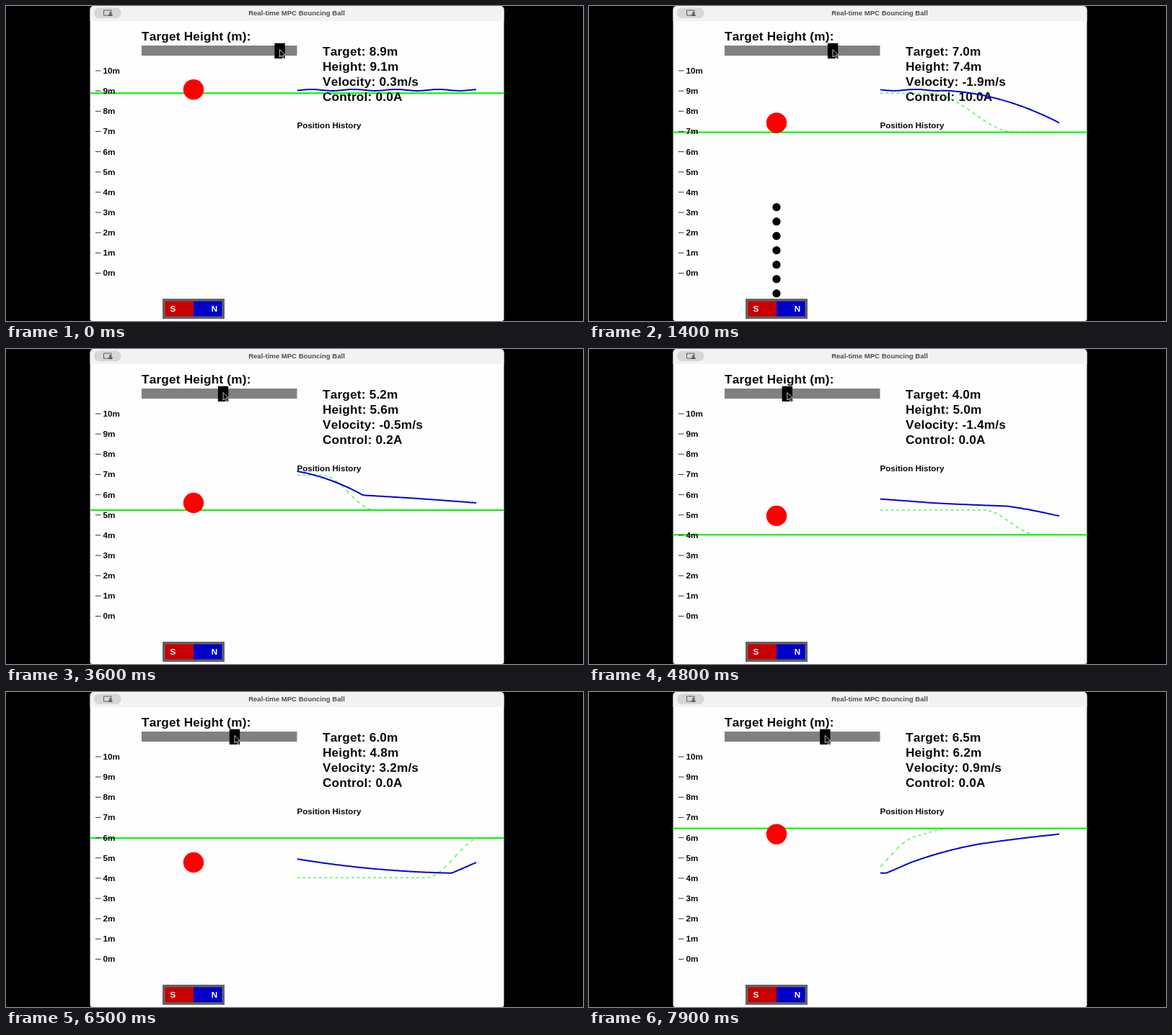
An HTML page with a canvas for the animation above (8000 ms loop, 800 px wide and 438 px high).

```html
<!DOCTYPE html>
<html lang="en">
<head>
<meta charset="utf-8">
<title>Real-time MPC Bouncing Ball</title>
<style>
html, body { margin: 0; width: 100%; height: 100%; overflow: hidden; background: #000; }
canvas { display: block; width: 800px; height: 438px; }
</style>
</head>
<body>
<canvas id="stage" width="800" height="438"></canvas>
<script>
const ctx = document.getElementById('stage').getContext('2d');
const LOOP = 8000, STEP = 100;
const SANS = '"Liberation Sans", Arial, sans-serif';
const INK = '#0a0a0a';
const ZERO = 371.5, METRE = 28.15;
const WIN = { x: 116.6, w: 573.8 };
const GRAPH = { x: 403.7, w: 248.3, span: 1690, n: 100 };
const BALL_X = 260;
const SPEED_SCALE = 1620 / METRE; // px per ms to shown m/s

// Slider drags: start, end (ms), change (m)
const drags = [
  [190, 980, -1.93], [2150, 2640, -1.72], [4090, 4590, -1.22],
  [6030, 6560, 2.03], [6480, 6860, 0.41]
];

// Arcs of the ball: start (ms), height there (px), bend
const arcs = [
  [300, 117.5, -39], [1400, 162.5, 0], [1900, 169.8, -18], [2532, 203.3, -2],
  [3600, 214, 1], [4310, 218.5, -3], [4760, 231, 16.5], [6269, 251.8, 0],
  [6500, 237, -8.5], [7140, 211.5, -2.4], [7900, 197.6, 0]
];

function ease(x) {
  x = Math.min(1, Math.max(0, x));
  return x * x * (3 - 2 * x);
}

const target = t =>
  drags.reduce((h, [a, b, change]) => h + change * ease((t - a) / (b - a)), 8.89);

function ballY(t) {
  if (t < arcs[0][0]) return 116.9 - Math.cos((t - 45) * Math.PI / 200);
  let i = 0;
  while (i < arcs.length - 2 && t >= arcs[i + 1][0]) i++;
  const [t0, y0, bend] = arcs[i], [t1, y1] = arcs[i + 1];
  const f = (t - t0) / (t1 - t0);
  return y0 + (y1 - y0) * f + bend * f * (1 - f);
}

// Mean upward speed between two times
const speed = (a, b) => (ballY(a) - ballY(b)) / (b - a) * SPEED_SCALE;

// The coil is on where the ball gains upward speed
function coil(t) {
  const gain = speed(t + 69, t + 71) - speed(t - 31, t - 29);
  return gain > 0 ? Math.min(10, 3 * gain * gain) : 0;
}

const toY = h => ZERO - h * METRE;

function rect(x, y, w, h, color) {
  ctx.fillStyle = color;
  ctx.fillRect(x, y, w, h);
}

function roundRect(x, y, w, h, radii, color) {
  ctx.fillStyle = color;
  ctx.beginPath();
  ctx.roundRect(x, y, w, h, radii);
  ctx.fill();
}

function disc(x, y, r, color) {
  ctx.fillStyle = color;
  ctx.beginPath();
  ctx.arc(x, y, r, 0, 2 * Math.PI);
  ctx.fill();
}

function text(s, x, y, size, color = INK, align = 'left', gap = 0) {
  ctx.font = `bold ${size}px ${SANS}`;
  ctx.fontKerning = 'none';
  ctx.letterSpacing = gap + 'px';
  ctx.textAlign = align;
  ctx.fillStyle = color;
  ctx.fillText(s, x, y);
}

const big = (s, x, y) => text(s, x, y, 17.2, INK, 'left', 0.2);

function drawWindow() {
  rect(0, 0, 800, 438, '#000');
  roundRect(WIN.x, 0, WIN.w, 438, [5, 5, 3, 3], '#fefefe');
  roundRect(WIN.x, 0, WIN.w, 21, [5, 5, 0, 0], '#f4f1f2');
  roundRect(122, 2.5, 37.5, 14.5, 7.25, '#d9d6d7');
  ctx.strokeStyle = '#5c5a5b';
  ctx.lineWidth = 1;
  ctx.strokeRect(135.5, 6, 10.5, 7);
  disc(144.5, 9.8, 1.5, '#5c5a5b');
  rect(142, 11.5, 5.5, 2.5, '#5c5a5b');
  text('Real-time MPC Bouncing Ball', 403, 13.2, 9.55, '#4f4d4e', 'center');
}

function drawScale() {
  for (let m = 0; m <= 10; m++) {
    const y = toY(m);
    rect(124, y - 0.5, 7.5, 1, '#333');
    text(m + 'm', 134.5, y + 3.9, 11.7);
  }
}

function drawMagnet(amps) {
  rect(217, 407, 86, 28, '#646464');
  rect(220.5, 410.5, 39.5, 21, '#c80000');
  rect(260, 410.5, 39.5, 21, '#0000c8');
  text('S', 231.3, 424.5, 11.7, '#fff', 'center');
  text('N', 289, 424.5, 11.7, '#fff', 'center');
  if (amps > 5) for (let i = 0; i < 7; i++) disc(BALL_X, 399.7 - 20 * i, 5.6, '#000');
}

function drawSlider(knob) {
  big('Target Height (m):', 188, 48.3);
  rect(188, 55, 215.5, 14, '#808080');
  rect(knob - 7.2, 51.7, 14.4, 21.3, '#000');
}

function drawReadout(t, amps) {
  const lines = [
    `Target: ${target(t).toFixed(1)}m`,
    `Height: ${((ZERO - ballY(t)) / METRE).toFixed(1)}m`,
    `Velocity: ${speed(t - 30, t + 70).toFixed(1)}m/s`,
    `Control: ${amps.toFixed(1)}A`
  ];
  lines.forEach((s, i) => big(s, 439, 69.2 + 21 * i));
}

function drawHistory(now) {
  const { x, w, span, n } = GRAPH;
  const px = i => x + w * i / (n - 1);
  const time = i => now - span * (1 - i / (n - 1));
  const goal = i => toY(target(time(i)));
  text('Position History', 403.5, 170, 11.6);
  ctx.lineJoin = 'round';

  ctx.strokeStyle = 'rgba(0, 245, 0, 0.65)';
  ctx.lineWidth = 1.5;
  ctx.beginPath();
  for (let i = 0; i < n - 2; i += 3) {
    ctx.moveTo(px(i), goal(i));
    ctx.lineTo(px(i + 1.6), goal(i + 1.6));
  }
  ctx.stroke();

  ctx.strokeStyle = '#0404d2';
  ctx.lineWidth = 2;
  ctx.beginPath();
  for (let i = 0; i < n; i++) ctx.lineTo(px(i), ballY(time(i)));
  ctx.stroke();
}

function drawCursor(x, y) {
  ctx.save();
  ctx.translate(x, y);
  ctx.beginPath();
  for (const [a, b] of [[0, 0], [0, 10.5], [2.4, 8.4], [4.1, 12.2], [5.9, 11.4], [4.3, 7.7], [7.5, 7.5]])
    ctx.lineTo(a, b);
  ctx.closePath();
  ctx.fillStyle = '#000';
  ctx.fill();
  ctx.strokeStyle = '#ddd';
  ctx.lineWidth = 0.9;
  ctx.stroke();
  ctx.restore();
}

function draw(t) {
  const amps = coil(t);
  const knob = 188.4 + 21.5 * target(t);
  drawWindow();
  rect(WIN.x, toY(target(t)) - 1.1, WIN.w, 2.2, '#0bf50b');
  drawScale();
  disc(BALL_X, ballY(t), 14.2, '#fe0000');
  drawMagnet(amps);
  drawSlider(knob);
  drawReadout(t, amps);
  drawHistory(t);
  drawCursor(knob, 60.5);
}

const start = performance.now();
function tick(now) {
  const t = Math.max(0, now - start) % LOOP;
  draw(Math.floor(t / STEP) * STEP);
  requestAnimationFrame(tick);
}
draw(0);
requestAnimationFrame(tick);
</script>
</body>
</html>
```
